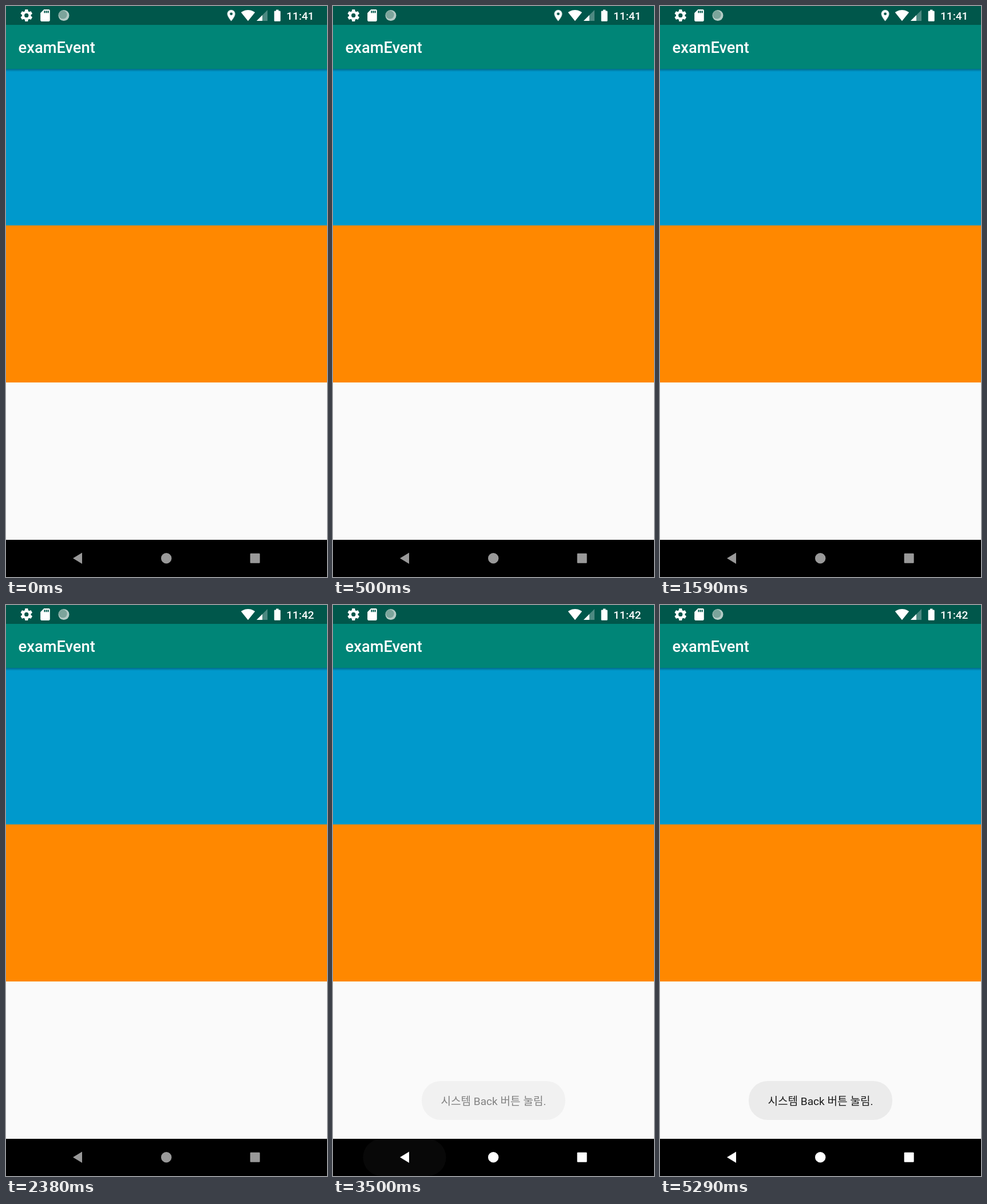
An HTML page that plays this animation: 561 by 998 pixels, repeating every 5330 ms.

```html
<!DOCTYPE html>
<html lang="ko">
<head>
<meta charset="utf-8">
<title>examEvent</title>
<style>
  html, body { margin: 0; width: 100%; height: 100%; overflow: hidden; background: #000; }
  svg { display: block; width: 561px; height: 998px; }
  text { font-family: Roboto, "Noto Sans CJK KR", "Noto Sans CJK", sans-serif; }
  .title, .clock { font-weight: 500; fill: #fff; }
  .title { font-size: 27.3px; }
  .clock { font-size: 19.1px; }
  .toast text { font-size: 19.1px; fill: #1c1c1c; text-anchor: middle; }

  .before, .after, .keys, .ripple, .toast { animation: 5330ms linear infinite; }
  .before { animation-name: leave; animation-timing-function: step-end; }
  .after { animation-name: arrive; animation-timing-function: step-end; }
  .keys { animation-name: wake; }
  .ripple { animation-name: ripple; transform-origin: 125px 965.5px; }
  .toast { animation-name: toast; }

  @keyframes leave { 0% { opacity: 1; } 33.58%, 100% { opacity: 0; } }
  @keyframes arrive { 0% { opacity: 0; } 33.58%, 100% { opacity: 1; } }
  @keyframes wake {
    0%, 57.22% { fill: #999; }
    61.73%, 100% { fill: #fff; }
  }
  @keyframes ripple {
    0%, 57.79% { opacity: 0; transform: scale(.75); }
    59% { opacity: .15; transform: scale(.92); }
    60.98% { opacity: .115; transform: scale(1); }
    67.54%, 100% { opacity: 0; transform: scale(1); }
  }
  @keyframes toast {
    0%, 62.66% { opacity: 0; }
    68.29%, 100% { opacity: 1; }
  }
</style>
</head>
<body>
<svg viewBox="0 0 561 998">
  <defs>
    <linearGradient id="shade" x2="0" y2="1">
      <stop stop-color="#000" stop-opacity=".3"/>
      <stop offset="1" stop-color="#000" stop-opacity="0"/>
    </linearGradient>
  </defs>

  <!-- Panels -->
  <rect y="110" width="561" height="274" fill="#09c"/>
  <rect y="383.5" width="561" height="274.5" fill="#f80"/>
  <rect y="658" width="561" height="275" fill="#fafafa"/>
  <rect y="110" width="561" height="5" fill="url(#shade)"/>

  <!-- App bar -->
  <rect y="32" width="561" height="78" fill="#008577"/>
  <rect width="561" height="33" fill="#00574b"/>
  <text class="title" x="21.5" y="81.5">examEvent</text>

  <!-- Status icons -->
  <g fill="#fff">
    <path transform="translate(23.3 4) scale(1.04)" d="M19.43 12.98c.04-.32.07-.64.07-.98s-.03-.66-.07-.98l2.11-1.65c.19-.15.24-.42.12-.64l-2-3.46c-.12-.22-.39-.3-.61-.22l-2.49 1c-.52-.4-1.08-.73-1.69-.98l-.38-2.65C14.46 2.18 14.25 2 14 2h-4c-.25 0-.46.18-.49.42l-.38 2.65c-.61.25-1.17.59-1.69.98l-2.49-1c-.23-.09-.49 0-.61.22l-2 3.46c-.13.22-.07.49.12.64l2.11 1.65c-.04.32-.07.65-.07.98s.03.66.07.98l-2.11 1.65c-.19.15-.24.42-.12.64l2 3.46c.12.22.39.3.61.22l2.49-1c.52.4 1.08.73 1.69.98l.38 2.65c.03.24.24.42.49.42h4c.25 0 .46-.18.49-.42l.38-2.65c.61-.25 1.17-.59 1.69-.98l2.49 1c.23.09.49 0 .61-.22l2-3.46c.12-.22.07-.49-.12-.64zM12 15.5a3.5 3.5 0 1 1 0-7 3.5 3.5 0 0 1 0 7z"/>
    <path transform="translate(56 4) scale(1.04)" d="M18 2h-8L4.02 8 4 20c0 1.1.9 2 2 2h12c1.1 0 2-.9 2-2V4c0-1.1-.9-2-2-2zm-6 6h-2V4h2zm3 0h-2V4h2zm3 0h-2V4h2z"/>
    <circle cx="101" cy="16.5" r="9.5" fill="#b4cbc6"/>
    <circle cx="99.5" cy="15.3" r="7.2" fill="#7ca49b"/>
    <path class="before" transform="translate(381.8 4.9) scale(.98)" d="M12 2C8.13 2 5 5.13 5 9c0 5.25 7 13 7 13s7-7.75 7-13c0-3.87-3.13-7-7-7zm0 9.5a2.5 2.5 0 1 1 0-5 2.5 2.5 0 0 1 0 5z"/>
    <path transform="translate(410.5 3.9) scale(1.04)" d="M12 21.5 23.64 7C23.19 6.66 18.71 3 12 3S.81 6.66.36 7z"/>
    <path d="M438 26h19V7z" opacity=".3"/>
    <path d="M438 26h10V16z"/>
    <path transform="translate(461 4.4) scale(1.1 1.02)" d="M15.67 4H14V2h-4v2H8.33C7.6 4 7 4.6 7 5.33v15.33C7 21.4 7.6 22 8.33 22h7.33c.74 0 1.34-.6 1.34-1.33V5.33C17 4.6 16.4 4 15.67 4z"/>
  </g>
  <text class="clock before" x="490" y="23.5">11:41</text>
  <text class="clock after" x="490" y="23.5">11:42</text>

  <!-- Toast -->
  <g class="toast">
    <rect x="155" y="832" width="251" height="68" rx="33" fill="#ebebeb"/>
    <text x="280.5" y="873.5">시스템 Back 버튼 눌림.</text>
  </g>

  <!-- Navigation bar -->
  <rect y="933" width="561" height="65"/>
  <rect class="ripple" x="52.5" y="933" width="145" height="65" rx="32.5" fill="#fff"/>
  <g class="keys">
    <path d="M117 965.2 133 955.5v19.4z"/>
    <circle cx="280.2" cy="965.2" r="9.2"/>
    <rect x="426.7" y="956.8" width="17" height="17" rx="1.2"/>
  </g>
</svg>
</body>
</html>
```
